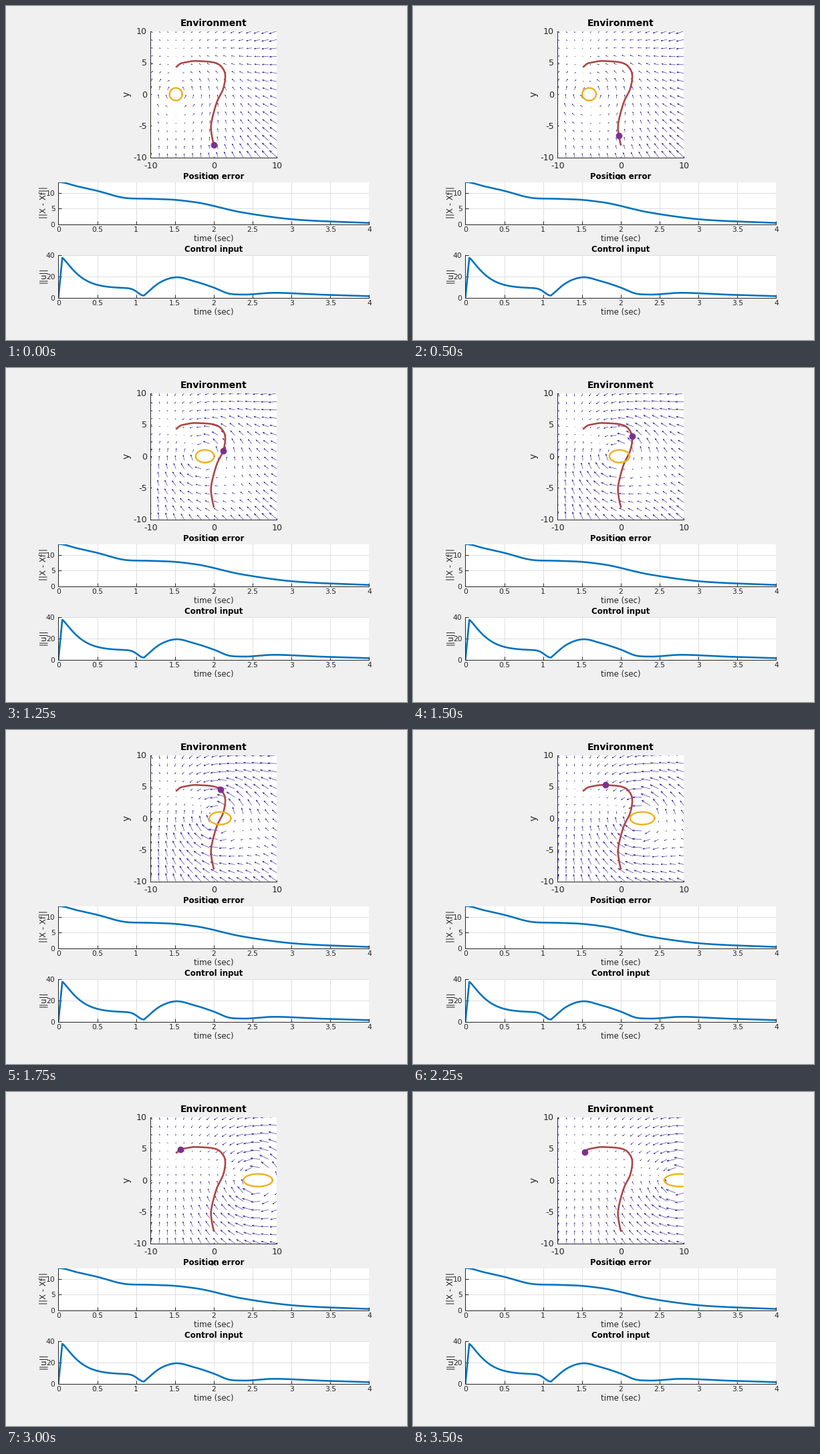
Animation, 600 px wide and 500 px high, one loop 3.75 s. Source, as a matplotlib script:

```python
import numpy as np
import matplotlib.pyplot as plt
from matplotlib.animation import FuncAnimation

W, H, DPI = 600, 500, 100
PX = 72 / DPI
INK = "#262626"
BLUE = "#0072bd"
GOAL = np.array([-6.0, 4.0])
REACH = 11.8  # how far the obstacle bends the flow

plt.rcParams["font.family"] = "DejaVu Sans"
fig = plt.figure(figsize=(W / DPI, H / DPI), dpi=DPI, facecolor="#f0f0f0")


def label(x, y, s, size, ha="center", **kw):
    """Text whose capitals are centred on pixel row y."""
    fig.text(x / W, 1 - (y + 0.365 * size) / H, s, fontsize=size * PX,
             ha=ha, va="baseline", **{"color": INK, **kw})


def side_label(x, y, s, size):
    fig.text(x / W, 1 - y / H, s, fontsize=size * PX, color=INK,
             ha="center", va="center", rotation=90)


def title(y, s, size):
    label(310.5, y, s, size, color="black", weight="bold")


def panel(x0, y0, x1, y1, xlim, ylim, xticks, yticks, tick, size, gap, grid):
    """Axes placed in pixels from the top left, with inward ticks and no box."""
    ax = fig.add_axes([x0 / W, 1 - y1 / H, (x1 - x0) / W, (y1 - y0) / H])
    ax.set(xlim=xlim, ylim=ylim, xticks=xticks, yticks=yticks)
    ax.spines[["top", "right"]].set_visible(False)
    for side in ("left", "bottom"):
        ax.spines[side].set(color=INK, linewidth=PX)
    ax.tick_params(direction="in", length=tick * PX, width=PX, color=INK,
                   labelbottom=False, labelleft=False)
    ax.set_axisbelow(True)
    if grid:
        ax.grid(color="#dedede", linewidth=PX)
    for t in xticks:
        px = x0 + (t - xlim[0]) / (xlim[1] - xlim[0]) * (x1 - x0)
        label(px, y1 + gap, f"{t:g}", size)
    for t in yticks:
        py = y1 - (t - ylim[0]) / (ylim[1] - ylim[0]) * (y1 - y0)
        label(x0 - 0.45 * size, py, f"{t:g}", size, ha="right")
    return ax


def time_panel(y0, y1, ymax, yticks, name, unit):
    ax = panel(78.4, y0, 543.4, y1, (0, 4), (0, ymax),
               np.arange(0, 4.1, 0.5), yticks, 4.6, 10.7, 7.6, True)
    title(y0 - 9.2, name, 11.75)
    label(311, y1 + 21.6, "time (sec)", 11.75)
    side_label(55.5, (y0 + y1) / 2 - 1.5, unit, 11.75)
    return ax


def smooth(t, knots, values, from_rest=False):
    """Cubic Hermite curve through the knots."""
    slope = np.gradient(values, knots)
    if from_rest:
        slope[0] = 0
    i = np.clip(np.searchsorted(knots, t, side="right") - 1, 0, len(knots) - 2)
    h = knots[i + 1] - knots[i]
    s = (t - knots[i]) / h
    return ((1 + 2 * s) * (1 - s) ** 2 * values[i]
            + s * (1 - s) ** 2 * h * slope[i]
            + s * s * (3 - 2 * s) * values[i + 1]
            + s * s * (s - 1) * h * slope[i + 1])


# Key poses of the robot: time, x, y
ROUTE = np.array([
    (0, 0, -8), (.25, -.3, -6.6), (.55, -.4, -4.65), (.85, .43, -1.4),
    (1.15, 1.5, .9), (1.45, 1.8, 3.15), (1.75, 1.02, 4.55),
    (2.35, -2.4, 5.26), (2.95, -4.65, 5.03), (4, -5.9, 4.37)]).T


def robot(t):
    return np.array([smooth(t, ROUTE[0], c, True) for c in ROUTE[1:]])


def effort(t):
    """Rise, decay to a kink at 1.1 s, then a hump and a low tail."""
    s = np.maximum(t - .05, 0)
    decay = (8.8 + 28.5 * np.exp(-5.95 * s ** 1.25)
             - 6.9 * np.exp(-((t - 1.1) / .11) ** 2))
    keys = np.array([(1.1, 1.9), (1.3, 13.9), (1.5, 19), (1.75, 15.3),
                     (2, 9.4), (2.2, 3.7), (2.35, 2.9), (2.75, 4.5),
                     (3.3, 3), (4, 1.4)]).T
    return np.where(t < .05, 746 * t,
                    np.where(t < 1.1, decay, smooth(t, *keys)))


def obstacle(t):
    """Centre and half width of the drifting ellipse."""
    return -6 + 4 * t, 1 + 0.4 * t


axis = np.linspace(-10, 10, 16)
grid = np.stack(np.meshgrid(axis, axis), axis=-1).reshape(-1, 2)


def flow(t):
    """Pull towards the goal, turned aside around the obstacle."""
    cx, a = obstacle(t)
    rel = grid - [cx, 0]
    dist = np.maximum(np.hypot(*rel.T), 1e-6)[:, None]
    n = rel / dist
    pull = GOAL - grid
    radial = (pull * n).sum(axis=1, keepdims=True) * n
    v = pull + np.exp(-(dist / REACH) ** 2) * (pull - 2 * radial)
    v[(rel[:, 0] / a) ** 2 + rel[:, 1] ** 2 <= 1] = 0
    return v * 1.59 / np.hypot(*v.T).max()


def arrows(t):
    """Polyline of shafts and open heads, split by NaN."""
    v = flow(t)
    side = np.stack([-v[:, 1], v[:, 0]], axis=1) * 0.09
    tip = grid + v
    back = grid + 0.75 * v
    gap = np.full_like(grid, np.nan)
    pts = np.stack([grid, tip, gap, back + side, tip, back - side, gap], axis=1)
    pts[np.hypot(*v.T) == 0] = np.nan
    return pts.reshape(-1, 2).T


ts = np.linspace(0, 4, 401)

env = panel(216.4, 37.6, 405.4, 226.6, (-10, 10), (-10, 10),
            [-10, 0, 10], [-10, -5, 0, 5, 10], 1.9, 12.6, 12, False)
title(25.3, "Environment", 13.9)
side_label(181, 132, "y", 13.9)
label(311, 255, "x", 13.9)
field, = env.plot([], [], color="#3a2ea0", lw=0.65 * PX,
                  solid_capstyle="butt", solid_joinstyle="miter")
env.plot(*robot(ts), color="#ad4545", lw=2.6 * PX)
ring, = env.plot([], [], color="#edb120", lw=2.4 * PX)
dot, = env.plot([], [], "o", color="#7e2f8e", ms=9 * PX, mew=0.8 * PX)

err = time_panel(263.6, 326.6, 13.42, [0, 5, 10], "Position error", "||X - Xf||")
err.plot(ts, np.hypot(*(robot(ts) - GOAL[:, None])), color=BLUE, lw=2.6 * PX)

ctl = time_panel(372.6, 436.6, 40, [0, 20, 40], "Control input", "||u||")
ctl.plot(ts, effort(ts), color=BLUE, lw=2.6 * PX)

turn = np.linspace(0, 2 * np.pi, 90)


def update(i):
    step = max(i - 1, 0)  # the opening pose holds for two ticks
    t = max(0.3 * step - 0.05, 0)
    cx, a = obstacle(t)
    field.set_data(*arrows(t))
    ring.set_data(cx + a * np.cos(turn), np.sin(turn))
    x, y = robot(t)
    dot.set_data([x], [y])
    return field, ring, dot


anim = FuncAnimation(fig, update, frames=15, interval=250, repeat=True,
                     repeat_delay=0, blit=False)
plt.show()
```
